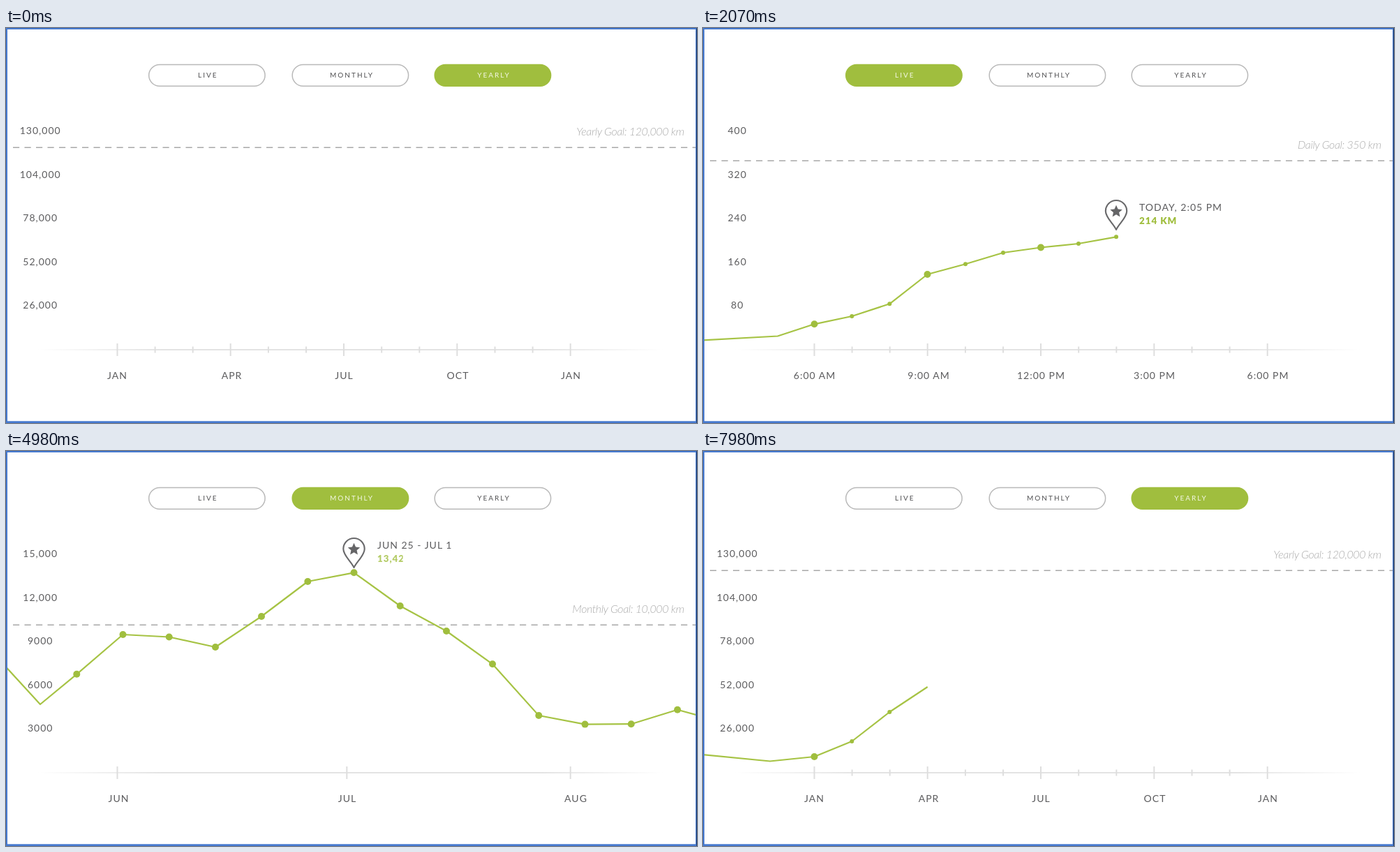
An HTML page that plays this animation: 990 by 566 pixels, repeating every 8 s.

```html
<!DOCTYPE html>
<html lang="en">
<head>
<meta charset="utf-8">
<title>Distance chart</title>
<style>
  html, body { margin: 0; width: 100%; height: 100%; overflow: hidden; background: #fff; }
  svg { display: block; width: 100%; height: 100%; }
  text { font-family: Lato, "Open Sans", sans-serif; }
  .label { font-size: 14px; letter-spacing: 1px; fill: #5c5c5e; }
  .mid { text-anchor: middle; }
  .tab { font-size: 10px; letter-spacing: 2px; fill: #4f4f51; }
  .goal { font-size: 16px; font-weight: 300; font-style: italic; letter-spacing: -.4px; fill: #acacac; text-anchor: end; }
  .value { font-size: 13.3px; font-weight: 900; letter-spacing: 1px; fill: #a0be3e; }
</style>
</head>
<body>
<svg id="stage" viewBox="0 0 990 566">
  <defs>
    <linearGradient id="axis" gradientUnits="userSpaceOnUse" x1="45" y1="0" x2="942" y2="0">
      <stop offset="0" stop-color="#dcdcdc" stop-opacity="0"/>
      <stop offset=".2" stop-color="#dcdcdc"/>
      <stop offset=".8" stop-color="#dcdcdc"/>
      <stop offset="1" stop-color="#dcdcdc" stop-opacity="0"/>
    </linearGradient>
  </defs>
</svg>
<script>
const LOOP = 8000, FADE = 480, GREEN = '#a0be3e';
const stage = document.getElementById('stage');

function add(parent, tag, attrs = {}, text) {
  const el = document.createElementNS('http://www.w3.org/2000/svg', tag);
  for (const key in attrs) el.setAttribute(key, attrs[key]);
  if (text) el.textContent = text;
  parent.appendChild(el);
  return el;
}
const clamp = v => Math.max(0, Math.min(1, v));
const span = (t, from, to) => clamp((t - from) / (to - from));
const smooth = p => p * p * (3 - 2 * p);

const quarters = [159.5, 321.7, 484, 646.3, 808.7];
const yearly = {
  tab: 2, scale: ['130,000', '104,000', '78,000', '52,000', '26,000'],
  labels: [['JAN', 159], ['APR', 323], ['JUL', 484], ['OCT', 647], ['JAN', 809]],
  ticks: quarters, minor: true, goal: 'Yearly Goal: 120,000 km', goalY: 171
};
const scenes = [
  { ...yearly, start: -FADE },
  {
    tab: 0, scale: ['400', '320', '240', '160', '80'],
    labels: [['6:00 AM', 159.5], ['9:00 AM', 323], ['12:00 PM', 484], ['3:00 PM', 646.5], ['6:00 PM', 809]],
    ticks: quarters, minor: true, goal: 'Daily Goal: 350 km', goalY: 190,
    start: 15, draw: 510, speed: 1.076,
    points: [[0, 447.3], [107, 441.5], [159.5, 424.3], [213.3, 413], [267.3, 395.3], [321.5, 353],
      [376, 338.3], [430, 322], [484, 314.5], [538, 309], [592, 299.3]],
    dots: i => i < 2 ? 0 : i % 3 === 2 ? 5 : 3,
    pin: { x: 592, y: 262, at: 1080, title: 'TODAY, 2:05 PM', value: '214 KM', textX: 625 }
  },
  {
    tab: 1, scale: ['15,000', '12,000', '9000', '6000', '3000'],
    labels: [['JUN', 161], ['JUL', 488.5], ['AUG', 816]],
    ticks: [159.5, 488.3, 808.7], goal: 'Monthly Goal: 10,000 km', goalY: 249,
    start: 3480, draw: 4030, speed: 1.13,
    points: [[0, 309.5], [49, 363], [101.3, 319.8], [167.5, 263], [233.7, 266.5], [300, 281], [366, 237],
      [432.3, 187], [498.5, 174.3], [564.7, 222], [631, 258], [697, 305.3], [763.3, 379], [829.5, 391.6],
      [895.7, 391.2], [962, 370.7], [990, 378.5]],
    dots: i => i > 1 && i < 16 ? 5 : 0,
    pin: { x: 498.5, y: 140, at: 4560, title: 'JUN 25 - JUL 1', value: '13,420 KM', textX: 532 }
  },
  {
    ...yearly, start: 7230, draw: 7710, speed: 1.19,
    points: [[0, 435.2], [96, 444.5], [159.5, 438], [213.3, 416], [267.3, 374], [321.7, 338]],
    dots: i => [0, 0, 5, 3, 3, 0][i]
  }
];

let clips = 0;
function wipe(parent, x, y, h) {
  const id = 'wipe' + clips++;
  const clip = add(parent, 'clipPath', { id });
  const rect = add(clip, 'rect', { x, y, width: 0, height: h });
  const group = add(parent, 'g', { 'clip-path': `url(#${id})` });
  return { rect, group };
}

function buildTabs(g, active) {
  ['LIVE', 'MONTHLY', 'YEARLY'].forEach((name, i) => {
    const x = [204.7, 410.2, 614.2][i], on = i === active;
    add(g, 'rect', {
      x, y: 52.4, width: 166.4, height: 30.8, rx: 15.4,
      fill: on ? GREEN : 'none', stroke: on ? GREEN : '#b9b9b9', 'stroke-width': 1.5
    });
    const label = add(g, 'text', { x: [289.3, 495.5, 699][i], y: 71.3, class: 'tab mid' }, name);
    if (on) label.style.fill = '#f4f8e6';
  });
}

function buildAxes(g, s) {
  s.scale.forEach((n, i) =>
    add(g, 'text', { x: 49.2, y: 152.2 + 62.5 * i, class: 'label mid' }, n));
  s.labels.forEach(([name, x]) =>
    add(g, 'text', { x: x + .5, y: 503.2, class: 'label mid' }, name));
  add(g, 'rect', { x: 45, y: 460.2, width: 897, height: 1.6, fill: 'url(#axis)' });
  const tick = (x, h) => add(g, 'rect', { x: x - 1, y: 461 - h, width: 2, height: 2 * h, fill: '#dedede' });
  s.ticks.forEach(x => tick(x, 9));
  if (s.minor) for (let i = 1; i < 12; i++) if (i % 3) tick(159.5 + 54.1 * i, 4.5);
  add(g, 'line', {
    x1: 10, x2: 988, y1: s.goalY + .3, y2: s.goalY + .3,
    stroke: '#a8a8a8', 'stroke-width': 1.5, 'stroke-dasharray': '9.2 7.3'
  });
  add(g, 'text', { x: 971.5, y: s.goalY - 17, class: 'goal' }, s.goal);
}

function buildLine(g, s) {
  s.line = wipe(g, -5, 100, 400);
  add(s.line.group, 'polyline', {
    points: s.points.join(' '), fill: 'none', stroke: '#a6c344', 'stroke-width': 2.2, 'stroke-linejoin': 'round'
  });
  s.marks = s.points.map(([cx, cy], i) => ({
    x: cx, r: s.dots(i), el: add(g, 'circle', { cx, cy, r: 0, fill: GREEN })
  })).filter(m => m.r);
}

function buildPin(g, p) {
  p.icon = add(g, 'g');
  add(p.icon, 'path', {
    d: 'M0 27C-4 18-15.2 10-15.2 .2A15.2 15.2 0 0 1 15.2 .2C15.2 10 4 18 0 27Z',
    fill: '#fff', 'fill-opacity': 0, stroke: '#69696b', 'stroke-width': 2.1, 'stroke-linejoin': 'round'
  });
  const star = Array.from({ length: 10 }, (_, i) => {
    const a = i * Math.PI / 5, r = i % 2 ? 4.3 : 9.2;
    return [r * Math.sin(a), 1 - r * Math.cos(a)];
  });
  add(p.icon, 'polygon', { points: star.join(' '), fill: '#656567' });
  p.rows = [['title', 'label', -1], ['value', 'value', 18.7]].map(([key, cls, dy]) => {
    const row = wipe(g, p.textX - 1, p.y + dy - 14, 20);
    add(row.group, 'text', { x: p.textX, y: p.y + dy + .5, class: cls }, p[key]);
    return row;
  });
}

for (const s of scenes) {
  s.root = add(stage, 'g');
  buildTabs(s.root, s.tab);
  buildAxes(s.root, s);
  if (s.points) buildLine(s.root, s);
  if (s.pin) buildPin(s.root, s.pin);
}

[[0, 0, 990, 2], [0, 0, 2, 566], [0, 563.3, 990, 2.7], [988, 0, 2, 566]].forEach(([x, y, width, height]) =>
  add(stage, 'rect', { x, y, width, height, fill: '#4579cf' }));
add(stage, 'rect', { x: 989, y: 0, width: 1, height: 566, fill: '#23406f' });

function updatePin(p, t) {
  const pop = span(t, p.at, p.at + 180);
  const k = 1 - (1 - pop) ** 3;
  p.icon.setAttribute('transform', `translate(${p.x} ${p.y + 27}) scale(${k}) translate(0 -27)`);
  p.icon.setAttribute('opacity', pop);
  p.rows.forEach((row, i) => {
    const from = p.at + 100 + i * 220;
    const shown = span(t, from, from + 220);
    row.rect.setAttribute('width', shown * (i ? 82 : 126));
    row.group.setAttribute('opacity', .6 + .4 * shown);
  });
}

function render(t) {
  scenes.forEach((s, i) => {
    const fadeIn = smooth(span(t, s.start, s.start + FADE));
    const next = scenes[i + 1];
    const fadeOut = next ? smooth(span(t, next.start, next.start + FADE)) : 0;
    const alpha = fadeIn * (1 - fadeOut);
    s.root.style.display = alpha ? '' : 'none';
    s.root.setAttribute('opacity', alpha);
    if (!alpha) return;
    if (s.points) {
      const x = Math.max(0, t - s.draw) * s.speed;
      s.line.rect.setAttribute('width', x ? x + 5 : 0);
      s.marks.forEach(m => m.el.setAttribute('r', m.r * span(x, m.x, m.x + 32)));
    }
    if (s.pin) updatePin(s.pin, t);
  });
}

const began = performance.now();
function frame() {
  render((performance.now() - began) % LOOP);
  requestAnimationFrame(frame);
}
render(0);
requestAnimationFrame(frame);
</script>
</body>
</html>
```
